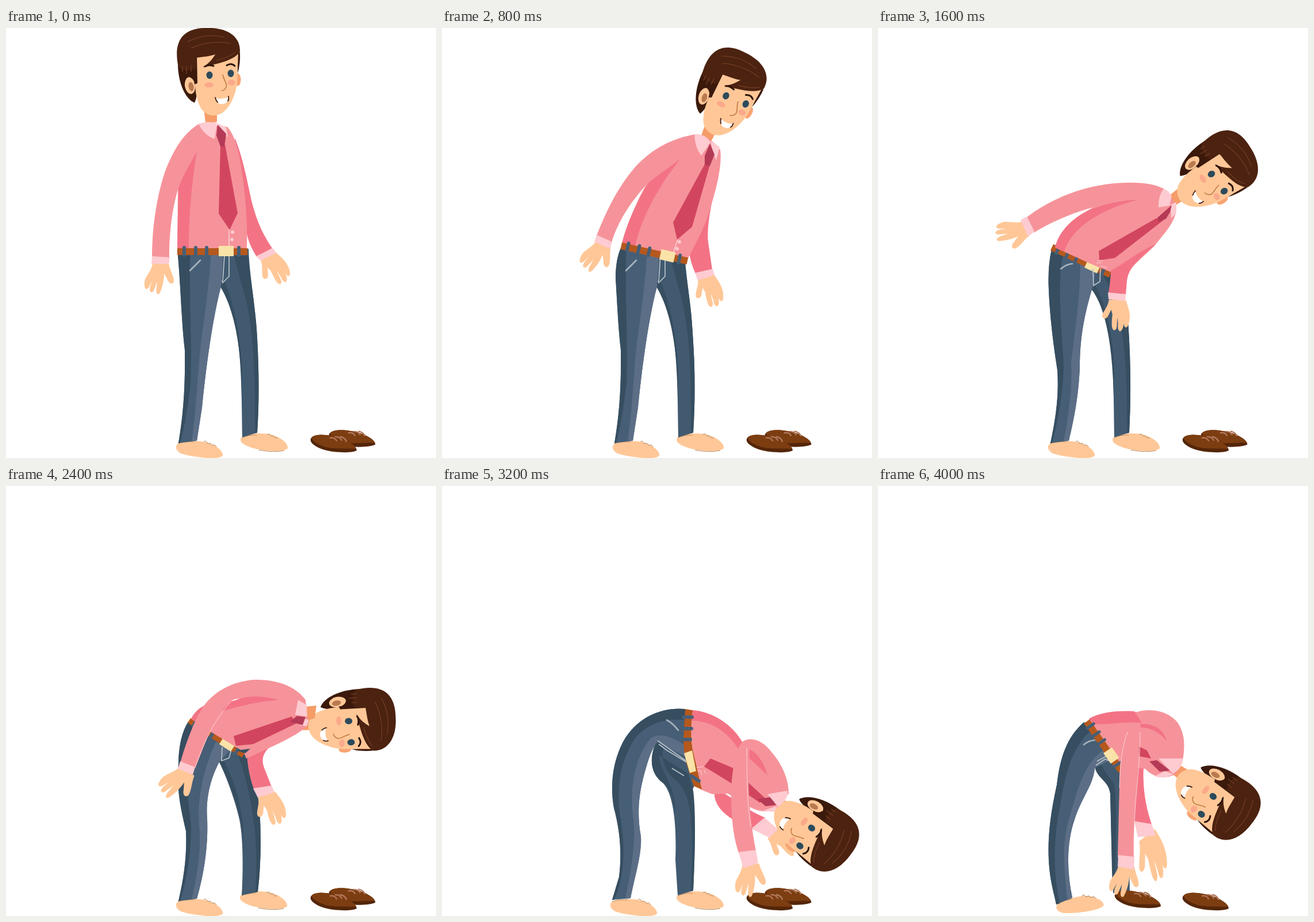
An HTML page for the animation above (4800 ms loop, 748 by 748 pixels).

```html
<!DOCTYPE html>
<html lang="en">
<head>
<meta charset="utf-8">
<title>Putting on shoes</title>
<style>
html, body { margin: 0; width: 100%; height: 100%; overflow: hidden; background: #fff }
svg { display: block; width: 100vw; height: 100vh }
.pose { display: none }
.skin { fill: #ffc797 } .shirt { fill: #f6939a } .shade { fill: #f37385 } .cuff { fill: #fdcbd1 }
.tie { fill: #d2455f } .knot { fill: #b43a56 } .hair { fill: #4c2210 } .hair2 { fill: #3b190b }
.jean { fill: #465f76 } .dark { fill: #364e60 } .light { fill: #5c6e86 } .leg2 { fill: #415a70 }
.belt { fill: #b5581d } .buckle { fill: #fae3a8 }
.line { fill: none; stroke: #b9c3ca; stroke-width: 1.7 }
.pocket { fill: none; stroke: #a9b4bc; stroke-width: 2.6; stroke-linecap: round }
.loop { fill: none; stroke: #465f76; stroke-width: 6; stroke-linecap: round }
.edge { fill: none; stroke: #fbd3d6; stroke-width: 1 }
.toe { fill: none; stroke: #b98962; stroke-width: 1 }
.lace { fill: none; stroke: #b0775a; stroke-width: 2.4; stroke-linecap: round }
</style>
</head>
<body>
<svg viewBox="0 0 748 748">
<defs>
  <!-- pivots on the left eye -->
  <g id="head"><g transform="translate(-354 -82)">
    <path fill="#f59c68" d="M344 140L347 164Q357 167 367 163V146Z"/>
    <path class="hair2" d="M299 62C299 95 312 124 328 130Q335 118 334 60Z"/>
    <ellipse fill="#f8a473" cx="403" cy="90" rx="5.5" ry="11"/>
    <path class="hair2" d="M402 45L407 42Q408 62 403 79Z"/>
    <path class="skin" d="M331 48C328 85 327 113 336 133C342 150 358 155 369 151C386 146 399 121 402 95L404 42L350 38Z"/>
    <ellipse class="skin" cx="320" cy="100" rx="9" ry="15" transform="rotate(-10 320 100)"/>
    <ellipse fill="#b97a50" cx="322" cy="102" rx="4.5" ry="8" transform="rotate(-10 322 102)"/>
    <path class="hair2" d="M299 60L303 88L311 108Q309 88 318 85Q328 88 328 98L333 96L332 48Z"/>
    <path class="hair" d="M300 68C291 28 303 -1 350 0C384 -1 408 14 407 41C398 55 375 61 342 68C353 62 359 54 364 46C352 50 341 50 331 52V70C319 76 309 75 300 68Z"/>
    <path fill="none" stroke="#6b3922" stroke-width="1.5" d="M316 24Q345 8 380 16M322 35Q355 20 391 27M365 56Q387 52 399 42M307 66V76M314 66V80M322 65V76"/>
    <path fill="none" stroke="#2b130a" stroke-width="3" stroke-linecap="round" d="M346 67Q352 63 361 66M384 65Q392 60 398 66"/>
    <g fill="#2c4b5c"><ellipse cx="354" cy="82" rx="5.5" ry="6.5"/><ellipse cx="391" cy="79" rx="5.5" ry="6.5"/></g>
    <g fill="#fba98b"><ellipse cx="353" cy="99" rx="8" ry="4.5"/><ellipse cx="392" cy="95" rx="6.5" ry="5"/></g>
    <path fill="none" stroke="#bd763f" stroke-width="1.5" d="M377 81C379 92 386 98 383 103Q380 109 375 109"/>
    <path fill="#fff" d="M365 122Q376 125 387 120C388 129 380 134 372 132Q366 129 365 122Z"/>
    <path fill="none" stroke="#442015" stroke-width="1.8" stroke-linecap="round" d="M364 121Q365 126 368 129M387 119Q388 124 386 127"/>
  </g></g>

  <!-- both hands pivot on the wrist -->
  <g id="handL"><path class="skin" transform="translate(-268 -411)" d="M255 409L283 409C285 421 292 431 292 440C291 447 284 446 281 438L275 427C275 441 271 455 267 462C263 465 260 461 262 451L263 441L257 457C253 463 248 459 251 449L254 440L248 452C242 458 239 449 242 437C246 428 254 420 255 409Z"/></g>
  <g id="handR"><path class="skin" transform="translate(-456 -398)" d="M443 404L469 390C480 400 491 408 494 425C495 433 490 433 486 427L482 420C488 429 490 437 488 441C485 444 481 440 478 433L471 423C475 433 482 441 478 445C473 448 467 437 461 423L455 417L456 431C454 439 447 438 446 431C445 421 447 414 443 404Z"/></g>

  <g id="belt">
    <path class="belt" d="M0 0H122V12H0Z"/>
    <path class="buckle" d="M72-4H98V14H72Z"/>
    <path class="loop" d="M12-1V12M32-1V12M51-1V12M107-1V12"/>
  </g>

  <g id="footL">
    <path class="skin" d="M297 725C304 718 325 718 338 719C360 721 378 734 377 744C370 752 328 747 307 741C297 737 294 731 297 725Z"/>
    <path class="toe" d="M299 723Q310 719 326 720M344 720l3-2 4 5 4-1 4 4 4-1 3 4"/>
  </g>
  <g id="footR">
    <path class="skin" d="M409 713C416 706 440 704 454 706C477 710 491 722 490 731C484 738 452 737 430 731C414 726 405 720 409 713Z"/>
    <path class="toe" d="M410 713Q420 708 436 708M454 707l4-1 3 4 4-1 3 4 5 0M440 734Q465 739 484 735"/>
  </g>
  <g id="shoe">
    <path fill="#542609" d="M531 713C537 706 556 707 568 710C588 713 611 726 610 735C600 740 570 739 551 733C537 728 526 720 531 713Z"/>
    <path fill="#7c3d11" d="M532 712C538 706 556 707 568 710C588 713 609 726 609 732C590 731 572 733 556 729C541 724 532 718 532 712Z"/>
    <path class="lace" d="M564 713Q572 712 575 718M573 711Q581 711 584 717M582 711Q590 713 592 719"/>
  </g>
  <g id="pair"><use href="#shoe" transform="translate(32 -9) rotate(-2 570 720)"/><use href="#shoe"/></g>

  <g id="legs">
    <path class="leg2" d="M365 384H422C423 430 434 480 437 540Q442 630 437 704L411 712C410 650 410 590 403 540C397 500 388 475 373 450Z"/>
    <path class="dark" d="M376 432C395 470 408 530 411 600L410 640C410 580 403 500 373 450ZM397 396H422C423 430 434 480 437 540Q442 630 437 704L433 705C434 610 431 520 414 460Q405 430 397 396Z"/>
    <path class="jean" d="M299 380H378L374 450C358 510 347 600 341 660L332 718L300 722C309 670 312 620 311 560C305 510 304 450 299 395Z"/>
    <path class="dark" d="M299 380H321C317 450 324 540 321 620Q312 690 303 722L300 722C309 670 312 620 311 560C305 510 304 450 299 395Z"/>
    <path class="light" d="M357 390H378L374 450C358 510 347 600 341 660L332 718L323 719C332 660 332 610 340 540Q352 460 357 390Z"/>
    <path class="line" d="M388 396V432L377 443L376 439M380 396L377 440"/>
    <path class="pocket" d="M320 422L338 404"/>
  </g>
  <clipPath id="waist"><path d="M302 430Q303 400 311 383L428 405L450 748H280Z"/></clipPath>
</defs>

<g class="pose">
  <use href="#head" transform="translate(354 82)"/>
  <use href="#footL"/><use href="#footR"/><use href="#pair"/>
  <use href="#legs"/>
  <use href="#handR" transform="translate(456 398)"/>
  <path class="shade" d="M398 191C413 228 419 265 427 300C437 340 449 362 463 383L436 398C424 378 419 365 416 340L400 250Z"/>
  <path class="cuff" d="M435 397L464 383L470 391L443 405Z"/>
  <path class="shirt" d="M337 166C315 185 300 220 299 280L298 384H419C420 345 418 310 413 270C408 225 400 188 385 172Z"/>
  <path class="shade" d="M300 278C309 250 321 233 332 214C324 265 318 320 318 384H298Z"/>
  <use href="#handL" transform="translate(268 411)"/>
  <path class="shirt" d="M337 166C308 183 292 212 278 246C263 288 254 345 254 399L284 400C284 350 290 310 300 278C310 250 325 230 333 212Z"/>
  <path class="cuff" d="M254 397L285 399L283 411L253 410Z"/>
  <path class="line" style="stroke:#fdcbd1" d="M388 350V380"/>
  <path class="cuff" d="M391 355a3 3 0 1 0 6 0a3 3 0 1 0-6 0M390 368a3 3 0 1 0 6 0a3 3 0 1 0-6 0M335 167Q348 161 367 165L363 193Q345 187 335 167ZM367 165L383 173L386 190L375 182Z"/>
  <path class="tie" d="M373 203H381L403 322L389 351L370 323Z"/>
  <path class="knot" d="M368 168L383 184L380 206H373L366 187Z"/>
  <use href="#belt" transform="translate(298 383)"/>
</g>

<g class="pose">
  <use href="#head" transform="translate(494 118) rotate(27)"/>
  <use href="#footL" x="1"/><use href="#footR"/><use href="#pair"/>
  <g clip-path="url(#waist)"><use href="#legs"/></g>
  <use href="#handR" transform="translate(459 434) rotate(14)"/>
  <path class="shade" d="M479 265C465 315 461 350 463 372L470 420L441 427C433 410 430 395 429 380Z"/>
  <path class="cuff" d="M440 426L471 419L474 430L445 439Z"/>
  <path class="shirt" d="M440 185C410 190 380 230 358 268C338 300 324 340 313 374L428 401C441 375 455 350 463 325C476 285 488 240 484 212Q466 187 440 185Z"/>
  <path class="shade" d="M360 268L414 228C382 270 350 320 336 379L313 374C322 338 340 300 360 268Z"/>
  <use href="#handL" transform="translate(279 377) rotate(22)"/>
  <path class="shirt" d="M440 185C400 192 365 210 335 243C305 278 284 322 269 361L295 373C305 340 325 305 360 268Q385 246 414 228Z"/>
  <path class="cuff" d="M269 360L296 372L292 384L265 372Z"/>
  <path class="line" style="stroke:#fdcbd1" d="M410 368L402 392"/>
  <path class="cuff" d="M410 372a3 3 0 1 0 6 0a3 3 0 1 0-6 0M406 384a3 3 0 1 0 6 0a3 3 0 1 0-6 0M439 185Q458 183 467 199L451 222Q440 208 439 185ZM467 196L483 207L477 230L471 215Z"/>
  <path class="tie" d="M457 237L466 238L435 346L409 368L402 338Z"/>
  <path class="knot" d="M466 201L474 220L466 240L457 238V222Z"/>
  <use href="#belt" transform="translate(313 373) rotate(13) scale(.97 1)"/>
</g>

<g class="pose">
  <use href="#head" transform="translate(580 254) rotate(58)"/>
  <use href="#footL"/><use href="#footR"/><use href="#pair"/>
  <path class="leg2" d="M365 410L404 422C420 445 432 475 435 510Q442 610 437 704L411 712C410 650 410 590 405 550C398 505 387 475 372 455Z"/>
  <path class="dark" d="M378 448C398 485 410 540 411 600L410 640C408 560 398 490 372 455ZM385 418L404 422C420 445 432 475 435 510Q442 610 437 704L433 705C434 600 430 520 405 455Z"/>
  <path class="jean" d="M302 385L380 418L372 455C357 505 351 545 351 590C349 640 341 680 332 718L300 722C309 680 315 640 312 595C304 545 299 500 297 455Q295 415 302 385Z"/>
  <path class="dark" d="M302 385L322 395C310 450 321 530 323 590Q320 660 303 722H300C309 680 315 640 312 595C304 545 299 500 297 455Q295 415 302 385Z"/>
  <path class="light" d="M352 406L380 418L372 455C357 505 351 545 351 590C349 640 341 680 332 718L323 719C332 670 338 630 336 580C342 530 352 470 352 406Z"/>
  <use href="#belt" transform="translate(305 376) rotate(25) scale(.92 1)"/>
  <path class="line" d="M374 419L375 448L386 441L387 418"/>
  <path class="pocket" d="M318 419Q327 411 338 410"/>
  <use href="#handR" transform="translate(416 474) rotate(30)"/>
  <path class="shirt" d="M430 270C465 268 490 275 505 285L519 310C520 335 500 355 480 380C460 400 445 410 436 425L409 426L384 416L363 407L308 382C315 352 340 330 368 316Z"/>
  <path class="shade" d="M368 316Q410 300 455 298C400 312 340 340 324 389L308 382C315 352 340 330 368 316ZM484 375C455 402 436 415 433 440L431 463L401 461Q405 435 405 422C425 412 445 394 484 375Z"/>
  <path class="cuff" d="M400 460L431 463L430 475L401 472Z"/>
  <use href="#handL" transform="translate(255 349) rotate(64)"/>
  <path class="shirt" d="M259 329C300 298 360 270 435 269Q485 268 505 285L455 298C400 301 330 320 271 356Z"/>
  <path class="cuff" d="M259 328L272 354L261 363L248 334Z"/>
  <path class="cuff" d="M497 279Q505 284 511 292L507 309L488 312Q487 293 497 279ZM509 307L519 303L519 322L510 331Z"/>
  <path class="tie" d="M484 331L497 334L412 400L385 404L384 388Z"/>
  <path class="knot" d="M486 330L511 308L508 320L501 332L488 337Z"/>
  <path class="edge" d="M381 411L383 405L391 404M384 409L389 408M386 414L399 417"/>
</g>

<g class="pose">
  <use href="#head" transform="translate(596 409) rotate(88)"/>
  <path fill="#f59c68" d="M519 384L540 382L537 404L522 408Z"/>
  <use href="#footL"/><use href="#footR" x="-1"/><use href="#pair"/>
  <path class="leg2" d="M365 440L420 463C430 495 437 530 441 560Q446 640 438 706L410 712C413 660 412 610 406 580C398 545 383 505 371 480Z"/>
  <path class="dark" d="M376 472C397 510 415 565 414 630C412 570 390 520 371 480ZM400 455L420 463C430 495 437 530 441 560Q446 640 438 706L434 707C438 620 435 560 400 455Z"/>
  <path class="jean" d="M317 410L393 456L371 480C355 510 347 545 350 580C352 630 343 680 332 718L300 722C310 680 315 640 313 600C304 560 298 535 300 500Q298 440 317 410Z"/>
  <path class="dark" d="M317 410L335 422C306 470 316 540 322 590Q322 660 303 722H300C310 680 315 640 313 600C304 560 298 535 300 500Q298 440 317 410Z"/>
  <path class="light" d="M365 445L393 456L371 480C355 510 347 545 350 580C352 630 343 680 332 718L323 719C334 670 340 630 336 590C332 540 345 490 365 445Z"/>
  <path class="line" d="M376 454L375 478L388 473L393 455"/>
  <use href="#handR" transform="translate(453 537) rotate(10) scale(1.04)"/>
  <path class="shade" d="M470 445C445 462 444 476 449 490L462 523L431 527Q421 500 419 466Z"/>
  <path class="cuff" d="M430 526L462 521L467 533L438 542Z"/>
  <use href="#belt" transform="translate(321 404) rotate(32.5) scale(.92 .8)"/>
  <path class="shirt" d="M322 405C332 385 350 378 370 374C390 350 410 337 435 337C475 337 505 350 521 372L526 415C510 432 480 445 455 457L418 474L413 462L392 449L350 424Z"/>
  <path class="shade" d="M322 405C333 384 350 378 372 375L400 372Q430 360 474 372Q425 376 372 393L340 417Z"/>
  <path class="dark" d="M401 460L425 457L416 465Z"/>
  <path fill="#fff" d="M388 376L394 371L407 370Z"/>
  <use href="#handL" transform="translate(313 497) rotate(33) scale(1.08)"/>
  <path class="shirt" d="M435 337C395 339 358 357 338 392C325 415 312 450 303 482L329 491C342 460 350 433 367 405C378 388 385 374 410 365Z"/>
  <path class="edge" d="M329 489C342 455 353 420 390 376"/>
  <path class="cuff" d="M303 479L329 489L325 502L299 492ZM508 372L523 381L524 401L503 398ZM518 404L527 407L523 418L511 416Z"/>
  <path class="tie" d="M396 435L497 401L505 413L430 449L400 452Z"/>
  <path class="knot" d="M494 410L506 400L521 402L516 416Z"/>
</g>

<g class="pose">
  <use href="#handR" transform="translate(577 604) rotate(-17)"/>
  <use href="#head" transform="translate(643 595) rotate(128)"/>
  <use href="#footL" x="-3"/><use href="#footR"/><use href="#pair"/>
  <path class="leg2" d="M374 443C360 470 361 500 385 517C405 540 408 600 406 650L410 712L437 704C440 640 442 570 435 530L442 515L425 462Z"/>
  <path class="dark" d="M374 443C360 470 361 500 385 517C398 527 403 545 405 570C408 520 380 500 377 468L428 500L437 530C442 570 440 640 437 704L433 705C438 590 435 540 410 515C390 500 380 480 385 455Z"/>
  <path class="jean" d="M424 388C385 384 340 400 315 445C297 480 292 520 299 560C310 600 313 640 308 680L296 720L328 717C335 680 348 640 346 610C338 565 343 530 355 490Q364 457 375 445L432 475L426 440Z"/>
  <path class="dark" d="M424 388C385 384 340 400 315 445C297 480 292 520 299 560C310 600 313 640 308 680L296 720H299C319 680 319 620 309 570C304 520 310 480 335 440C360 410 390 405 424 407Z"/>
  <path class="light" d="M428 455C400 435 380 429 364 438C335 470 325 530 333 580C338 620 327 680 319 718L328 717C335 680 348 640 346 610C338 565 343 530 355 490Q364 457 375 445L431 475Z"/>
  <path class="line" d="M375 443L426 479M377 449L390 459L428 482M400 491L421 504"/>
  <path class="pocket" d="M391 407Q402 413 411 425"/>
  <path class="shade" d="M474 525C497 535 525 562 562 577L540 597C510 583 480 570 474 540Z"/>
  <path class="cuff" d="M538 596L561 577L584 597L570 612Z"/>
  <path class="shirt" d="M435 390C470 392 505 415 522 445C538 435 558 442 575 465C592 485 603 510 603 535L585 558C570 570 550 567 535 558L497 535L470 536L450 528L437 463C432 440 432 415 435 390Z"/>
  <path class="shade" d="M435 390C470 392 505 415 522 445L515 457C495 425 465 408 433 408ZM530 457C545 459 561 480 566 503C552 490 540 478 530 470Z"/>
  <path class="tie" d="M456 488L467 474L505 490L562 543L553 551L500 515Z"/>
  <path class="knot" d="M549 545L572 541L581 555L563 557Z"/>
  <path class="cuff" d="M566 536L601 530Q604 543 585 558ZM584 556L578 567L558 565Z"/>
  <path class="belt" d="M423 388L436 390C432 420 433 445 437 463L452 528L438 522C427 490 420 470 420 440Z"/>
  <path class="buckle" d="M421 465L435 460L442 496L431 499Z"/>
  <path class="loop" d="M420 402H435M420 422H434M420 441H432M433 504L447 513"/>
  <path class="edge" d="M443 490L455 488M444 496L450 495L452 503M456 494L459 501"/>
  <use href="#handL" transform="translate(536 660) rotate(-4) scale(1.05)"/>
  <path class="shirt" d="M524 446C510 465 502 500 503 545C504 590 509 620 517 640L546 634C537 590 531 530 534 480L535 445Z"/>
  <path class="edge" d="M530 455C531 500 530 550 537 592"/>
  <path class="cuff" d="M516 637L546 633L550 656L524 665Z"/>
</g>

<g class="pose">
  <use href="#head" transform="translate(583 540) rotate(128)"/>
  <use href="#footL" transform="translate(14 -5) rotate(-14 337 732)"/>
  <use href="#shoe"/>
  <path class="leg2" d="M377 488C381 509 401 512 404 535L407 670L409 708H438L436 600L423 490L400 455Z"/>
  <path class="dark" d="M377 488C381 509 401 512 404 535L408 690L412 690C413 630 418 540 409 515Q395 500 386 480Z"/>
  <use href="#shoe" transform="translate(-118 -4)"/>
  <path class="jean" d="M358 411C325 440 316 480 311 520C300 570 295 610 297 650C299 690 307 710 310 728L338 716C328 670 328 620 342 580C355 540 375 520 377 490L412 473L370 415Z"/>
  <path class="dark" d="M358 411C325 440 316 480 311 520C300 570 295 610 297 650C299 690 307 710 310 728L316 726C304 670 305 610 318 550C325 500 340 450 372 424Z"/>
  <path class="light" d="M400 455C360 476 350 520 335 570C316 630 326 670 329 721L338 716C328 670 328 620 342 580C355 540 375 520 377 490L412 473Z"/>
  <path class="line" d="M379 486L395 475L412 482M381 479L397 470L409 474"/>
  <path class="pocket" d="M358 450Q366 443 377 442"/>
  <use href="#handR" transform="translate(468 609) rotate(4) scale(1 1.62)"/>
  <path class="shade" d="M446 485L462 490C460 525 466 560 476 588L444 585Z"/>
  <path class="cuff" d="M446 583L476 588L483 608L452 611Z"/>
  <path class="shirt" d="M367 405C385 394 410 391 450 393C475 386 503 391 520 410C535 430 534 455 530 477L518 501C500 511 478 507 465 492L447 490L424 490Z"/>
  <path class="shade" d="M367 405C385 394 415 390 446 392L459 412C430 409 400 416 376 414ZM456 414C480 412 498 425 502 443C490 428 470 419 456 420Z"/>
  <path class="tie" d="M454 453L468 460L475 474L454 470Z"/>
  <path class="knot" d="M472 479L485 477L508 495L490 497Z"/>
  <path class="cuff" d="M488 474L531 474Q529 492 513 500ZM481 505Q500 511 513 501L499 496Z"/>
  <use href="#belt" transform="translate(368 406) rotate(55) scale(.86 1)"/>
  <use href="#handL" transform="translate(431 663) rotate(3)"/>
  <path class="shirt" d="M436 415C424 440 421 480 420 520L417 646L445 647C443 590 452 520 455 430L457 412Z"/>
  <path class="edge" d="M434 428C424 455 421 485 420 525M456 428C456 490 447 540 446 590"/>
  <path class="cuff" d="M418 642L446 645L445 667L417 662Z"/>
</g>
</svg>
<script>
const HOLD = 800;
const poses = [...document.querySelectorAll('.pose')];
function render(now) {
  const current = Math.floor(now / HOLD) % poses.length;
  poses.forEach((pose, i) => pose.style.display = i === current ? 'inline' : 'none');
  requestAnimationFrame(render);
}
render(performance.now());
</script>
</body>
</html>
```
